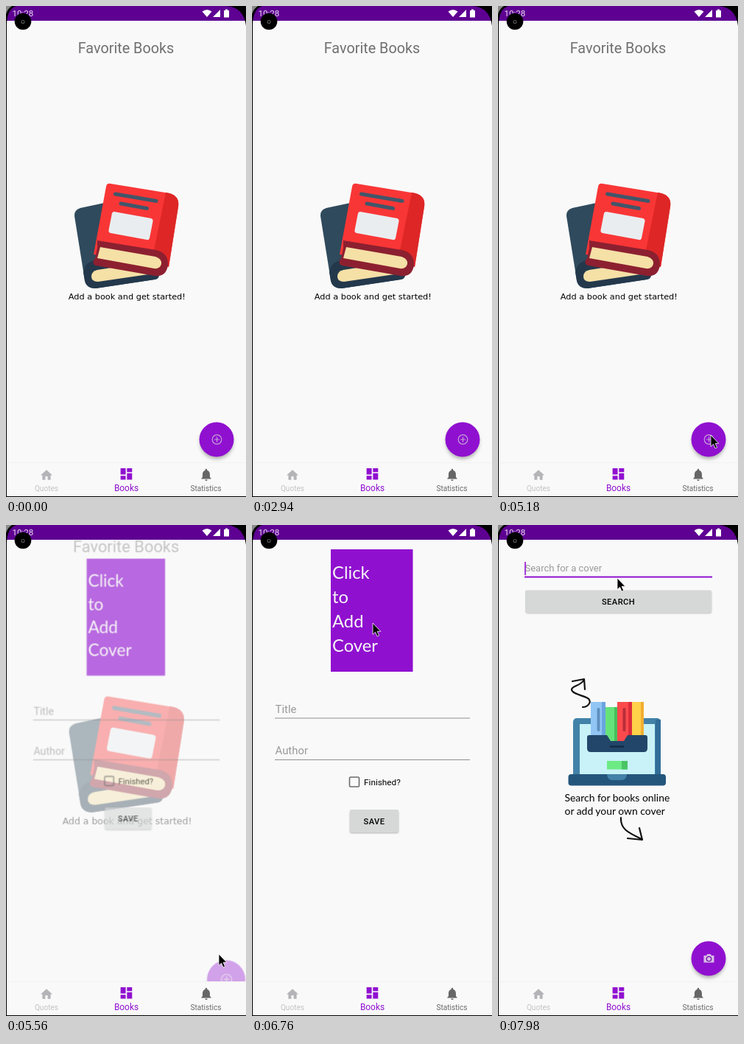
An HTML page that plays this animation: 326x666 px, repeating every 8000 ms.

```html
<!DOCTYPE html>
<html lang="en">
<head>
<meta charset="utf-8">
<title>Favorite Books</title>
<style>
html, body { margin: 0; width: 100%; height: 100%; overflow: hidden; background: #f9f9f9; }
svg { display: block; width: 326px; height: 666px; font-family: Roboto, sans-serif; }
.hint { fill: #9a9a9a; }
.rule { stroke: #8f8f8f; stroke-width: 1; }
.btn { fill: #d6d7d7; }
.shade { fill: #666; }
.accent { fill: #9010d0; }
.med { font-weight: 500; }
.note { font-family: Lato, sans-serif; }
.mid { text-anchor: middle; }
</style>
</head>
<body>
<svg viewBox="0 0 326 666">
  <defs>
    <clipPath id="content"><rect y="20" width="326" height="600"/></clipPath>
    <filter id="soft" x="-30%" y="-30%" width="160%" height="170%"><feGaussianBlur stdDeviation="2.5"/></filter>
    <filter id="thin" x="-10%" y="-30%" width="120%" height="170%"><feGaussianBlur stdDeviation="1"/></filter>
    <g id="fab">
      <circle class="shade" cx="286" cy="592" r="22.5" opacity=".5" filter="url(#soft)"/>
      <circle class="accent" cx="286" cy="588" r="23.5"/>
    </g>
  </defs>
  <rect width="326" height="666" fill="#f9f9f9"/>

  <g clip-path="url(#content)">
    <g id="books">
      <text class="mid" x="163" y="64" font-size="19.8" fill="#707070">Favorite Books</text>
      <path d="M134 267L101 274Q92 277 93 285L107 372Q110 384 122 383L202 371Q208 370 208 364L190 300Z" fill="#2f4a5c"/>
      <path d="M105 361Q108 346 122 345L190 337L208 364Q208 370 202 371L122 383Q109 383 107 373Z" fill="#24384c"/>
      <path d="M124 358L200 346L207 362L125 374Q116 374 116 367Q116 360 124 358Z" fill="#f5e0a6"/>
      <path d="M142 241L222 254Q236 258 234 272L221 354L119 337L136 245Q137 240 142 241Z" fill="#f93636"/>
      <path d="M217 253L222 254Q236 258 234 272L221 354L200 336Z" fill="#de2626"/>
      <path d="M124 318L204 331Q221 335 220 352Q217 368 202 366L122 352Q117 350 119 345L121 342L124 328Z" fill="#8c2030"/>
      <path d="M128 327L203 340Q212 343 211 350Q209 357 201 356L124 342Z" fill="#f5e0a6"/>
      <path d="M148.5 255L204 264.5M156 268L191.5 274.5" stroke="#41566a" stroke-width="5" stroke-linecap="round"/>
      <path d="M147 279L197 288Q200 289 199.5 292L195 315Q194 318 191 317L142 308Q139 307 139.5 304L144 281Q145 279 147 279Z" fill="#eaedf0"/>
      <text class="mid" x="164.3" y="397.5" font-size="11.3" font-family="DejaVu Sans, sans-serif">Add a book and get started!</text>
      <use href="#fab"/>
      <g fill="none" stroke="#c4a0d8" stroke-width="1.2">
        <circle cx="286.5" cy="588" r="6.3"/><path d="M283 588h7M286.5 584.5v7"/>
      </g>
    </g>

    <g id="form">
      <rect class="accent" x="107" y="33" width="111.5" height="166"/>
      <g class="note" font-size="23.8" fill="#f6f6f6">
        <text x="109" y="73">Click</text><text x="109" y="106">to</text>
        <text x="109" y="139">Add</text><text x="109" y="171.5">Cover</text>
      </g>
      <g class="hint" font-size="14.9">
        <text x="31.5" y="255">Title</text><text x="31.5" y="311">Author</text>
      </g>
      <path class="rule" d="M31 262h265M31 318.5h265"/>
      <rect x="132.5" y="342" width="13" height="13" rx="1.5" fill="none" stroke="#6b6b6b" stroke-width="1.6"/>
      <text x="152" y="353" font-size="11.8">Finished?</text>
      <rect class="shade" x="133" y="388" width="66" height="30" rx="2" opacity=".5" filter="url(#thin)"/>
      <rect class="btn" x="133" y="386" width="66" height="31" rx="2"/>
      <text class="mid med" x="166" y="406" font-size="11.2" letter-spacing=".4">SAVE</text>
    </g>

    <g id="search">
      <text class="hint" x="36.5" y="63" font-size="13">Search for a cover</text>
      <path id="line" d="M36 70.5h255"/>
      <path id="caret" d="M37 50v18" stroke="#9010d0" stroke-width="1.6"/>
      <rect class="shade" x="38" y="90" width="252" height="30" rx="2" opacity=".4" filter="url(#thin)"/>
      <rect class="btn" x="37" y="88.5" width="253" height="30.5" rx="2"/>
      <text class="mid med" x="163.5" y="108" font-size="11.2" letter-spacing=".4">SEARCH</text>

      <rect x="102" y="262" width="119" height="82" rx="5" fill="#4382a8"/>
      <rect x="214" y="264" width="7" height="76" fill="#316d98"/>
      <rect x="111" y="270" width="102" height="69" fill="#c8f2f8"/>
      <path d="M126 240h20v50h-20z" fill="#91c6f4"/>
      <path d="M141 240h5v50h-5z" fill="#6ba4e0"/>
      <path d="M146 247h16v46h-16z" fill="#66e27a"/>
      <path d="M158 247h4v46h-4z" fill="#45c05c"/>
      <path d="M162 240h20v53h-20z" fill="#fb4a4c"/>
      <path d="M177 240h5v53h-5z" fill="#dc2d3a"/>
      <path d="M182 240h16v50h-16z" fill="#ffd24a"/>
      <path d="M194 240h4v50h-4z" fill="#f2ae32"/>
      <path d="M136.5 250v28" stroke="#5e8fc0" stroke-width="4" stroke-linecap="round"/>
      <path d="M171.5 250v28" stroke="#b92d3a" stroke-width="4" stroke-linecap="round"/>
      <path d="M124 285h24l5 8h18l5-8h24q3 0 3 3v15q0 5-5 5h-72q-5 0-5-5v-15q0-3 3-3z" fill="#22466a"/>
      <path d="M153 300.5h17" stroke="#14304c" stroke-width="3" stroke-linecap="round"/>
      <rect x="148" y="320" width="28" height="11.5" fill="#6cea84"/>
      <rect x="168" y="320" width="8" height="11.5" fill="#49c464"/>
      <rect x="95.5" y="338" width="132.5" height="15.5" rx="4" fill="#24567c"/>
      <path d="M148 338h27q-1 8-7 8h-13q-6 0-7-8z" fill="#4382a8"/>
      <g class="note" font-size="13.9">
        <text x="90.5" y="375">Search for books online</text>
        <text x="90.5" y="393">or add your own cover</text>
      </g>
      <path d="M115 247C123 247 128 239 122 235C115 231 100 229 100 223C101 218 111 219 117 210M101 212L117 209L118 223M167 397C166 412 176 417 195 426M176 425L196 427L192 411" fill="none" stroke="#111" stroke-width="2.2" stroke-linecap="round" stroke-linejoin="round"/>
      <use href="#fab"/>
      <path d="M279.5 584h3.5l1.3-2h4.4l1.3 2h3.5v9.5h-14z" fill="#d8bce6"/>
      <circle cx="286.5" cy="588.5" r="3.2" fill="#d8bce6" stroke="#7010a8" stroke-width="1.3"/>
    </g>
  </g>

  <path d="M0 619.5h326" stroke="#f1f1f1"/>
  <g font-size="10.1" class="mid">
    <path d="M10 20v-6h4v6h5v-8h3L12 3 2 12h3v8z" transform="translate(45.4 626.8) scale(.8)" fill="#b4b4b8"/>
    <text x="55" y="657.5" fill="#c3c3c6">Quotes</text>
    <path class="accent" d="M3 13h8V3H3zM3 21h8v-6H3zM13 21h8V11h-8zM13 3v6h8V3z" transform="translate(153 624.3) scale(.87)"/>
    <text class="accent" x="163.5" y="658" font-size="11.9">Books</text>
    <path d="M12 22c1.1 0 2-.9 2-2h-4c0 1.1.9 2 2 2zM18 16v-5c0-3-1.6-5.6-4.5-6.3V4a1.5 1.5 0 0 0-3 0v.7C7.6 5.4 6 8 6 11v5l-2 2v1h16v-1z" transform="translate(262 625.8) scale(.83)" fill="#666"/>
    <text x="271.5" y="657.5" fill="#6a6a6a">Statistics</text>
  </g>

  <rect width="326" height="20" fill="#5e0092"/>
  <text x="8.5" y="14" font-size="11.5" fill="#eee4f4">10:28</text>
  <g fill="#fff">
    <path d="M266.5 7.5Q273 2.5 279.5 7.5L273 15z"/>
    <path d="M281 15h10V5z"/>
    <path d="M296 6h2V4.5h3V6h2v9.5h-7z"/>
  </g>
  <path d="M0 0H14Q1 4 1 26V666H0zM326 0H300Q323 2 326 27zM0 665h326v1H0z"/>
  <path d="M0 0H8Q2 4 0 11z" fill="#8a8a8a"/>
  <circle cx="23" cy="21" r="11.3"/>
  <circle cx="23" cy="21.5" r="2" fill="none" stroke="#555" stroke-width="1.2"/>
  <path id="cursor" d="M0 0V15.5L3.5 12.3 6 18 8.6 16.9 6.1 11.3H10.8Z" stroke="#fff" stroke-width=".8"/>
</svg>
<script>
const LOOP = 8000, OPEN_FORM = 5495, OPEN_SEARCH = 7175, FOCUS = 7750;
const $ = id => document.getElementById(id);
const clamp = v => Math.min(1, Math.max(0, v));
const span = (t, from, to) => clamp((t - from) / (to - from));
const smooth = p => p * p * (3 - 2 * p);
const settle = p => 1 - (1 - p) ** 2;
const mix = (a, b, p) => a + (b - a) * p;

function bezier(x, [x0, y0], [x1, y1], [x2, y2], [x3, y3]) {
  const at = (s, a, b, c, d) =>
    (1 - s) ** 3 * a + 3 * s * (1 - s) ** 2 * b + 3 * s * s * (1 - s) * c + s ** 3 * d;
  let lo = 0, hi = 1;
  for (let i = 0; i < 24; i++) {
    const s = (lo + hi) / 2;
    if (at(s, x0, x1, x2, x3) < x) lo = s; else hi = s;
  }
  return at(lo, y0, y1, y2, y3);
}

// Fast start, very slow finish
function easeOpen(p) {
  if (p <= 0 || p >= 1) return clamp(p);
  const knee = [1 / 6, 0.4];
  return p < knee[0]
    ? bezier(p, [0, 0], [0.05, 0], [0.1333, 0.06], knee)
    : bezier(p, knee, [0.2083, 0.82], [0.25, 1], [1, 1]);
}

function place(id, t, enter, leave) {
  const grow = at => easeOpen(span(t, at, at + 300));
  const fade = at => span(t, at + 35, at + 85);
  const scale = mix(0.85, 1, grow(enter)) * mix(1, 1.15, grow(leave));
  const alpha = fade(enter) * (1 - fade(leave));
  const el = $(id);
  el.setAttribute("transform", `translate(163 320) scale(${scale}) translate(-163 -320)`);
  el.setAttribute("opacity", alpha);
  el.style.display = alpha ? "" : "none";
}

function pointer(t) {
  const toFab = settle(span(t, 2960, 3500));
  const toCover = smooth(span(t, 5800, 6700));
  const toField = smooth(span(t, 7300, 7650));
  return [
    mix(mix(mix(330, 289, toFab), 164, toCover ** 1.36), 162, toField),
    mix(mix(mix(592, 582, toFab), 133, toCover), 72, toField)
  ];
}

function draw(t) {
  place("books", t, -1000, OPEN_FORM);
  place("form", t, OPEN_FORM, OPEN_SEARCH);
  place("search", t, OPEN_SEARCH, LOOP * 2);

  const focused = t >= FOCUS;
  $("line").setAttribute("stroke", focused ? "#9010d0" : "#8f8f8f");
  $("line").setAttribute("stroke-width", focused ? 1.8 : 1);
  $("caret").style.display = focused ? "" : "none";

  $("cursor").setAttribute("transform", `translate(${pointer(t).join(" ")})`);
}

function tick() {
  draw(performance.now() % LOOP);
  requestAnimationFrame(tick);
}
tick();
</script>
</body>
</html>
```
